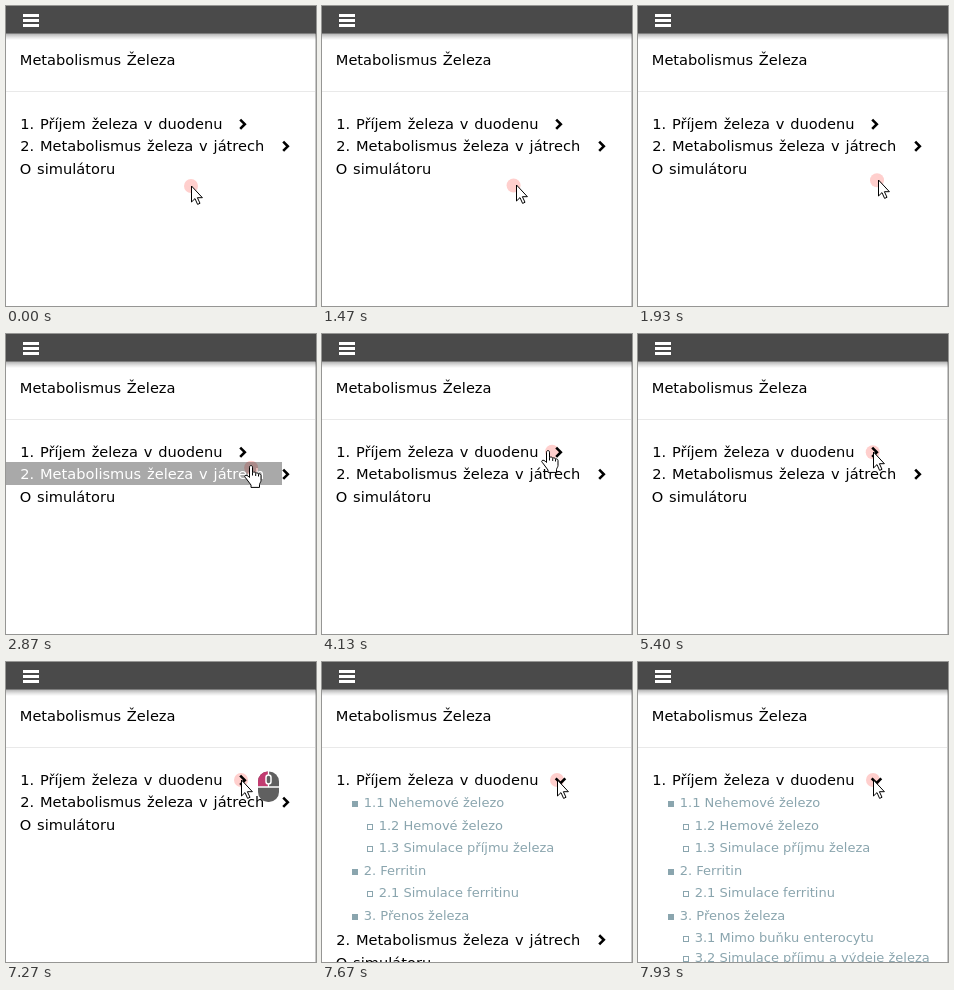
An HTML page for the animation above (8 s loop, 310 by 300 pixels).

```html
<!DOCTYPE html>
<html lang="cs">
<head>
<meta charset="utf-8">
<title>Menu</title>
<style>
  html, body { margin: 0; width: 100%; height: 100%; overflow: hidden; background: #fff; }
  svg { display: block; width: 310px; height: 300px; }
  text { font-family: "DejaVu Sans", Verdana, sans-serif; white-space: pre; }
  .item { font-size: 14.6px; word-spacing: 1.2px; }
  .sub { font-size: 13px; fill: #8aa5ae; }
  .chevron { fill: none; stroke: #000; stroke-width: 2.6px; }
  #halo { fill: #ffcfcd; mix-blend-mode: multiply; }
</style>
</head>
<body>
<svg viewBox="0 0 310 300" xmlns="http://www.w3.org/2000/svg">
  <defs>
    <linearGradient id="shade" x1="0" y1="0" x2="0" y2="1">
      <stop offset="0" stop-opacity=".65"/>
      <stop offset=".2" stop-opacity=".26"/>
      <stop offset=".6" stop-opacity=".11"/>
      <stop offset="1" stop-opacity="0"/>
    </linearGradient>
    <clipPath id="fold"><rect id="foldBox" x="0" y="129" width="310" height="0"/></clipPath>
  </defs>
  <rect width="310" height="300" fill="#fff"/>
  <rect y="85" width="309" height="1" fill="#e9e9e9"/>
  <text class="item" x="13.8" y="59">Metabolismus Železa</text>

  <rect id="hover1" y="106" width="233" height="22" fill="#a9a9a9"/>
  <text id="label1" class="item" x="14.2" y="123">1. Příjem železa v duodenu</text>
  <path id="closed" class="chevron" d="M234.2 113.6l4.6 4.6l-4.6 4.6"/>
  <path id="open" class="chevron" d="M233.7 116.4l4.8 4.8l4.8 -4.8"/>
  <g id="subs" clip-path="url(#fold)"></g>
  <g id="rest">
    <rect id="hover2" y="128" width="276" height="23" fill="#a9a9a9"/>
    <text id="label2" class="item" x="14.2" y="145">2. Metabolismus železa v játrech</text>
    <path class="chevron" d="M277.2 135.7l4.6 4.6l-4.6 4.6"/>
    <text class="item" x="13.8" y="168">O simulátoru</text>
  </g>

  <rect x="309" y="27" width="1" height="273" fill="#c8c8c8"/>
  <rect y="27" width="310" height="7" fill="url(#shade)"/>
  <rect width="310" height="27" fill="#4a4a4a"/>
  <path d="M17 9.5h16M17 14.5h16M17 19.5h16" stroke="#fff" stroke-width="2.8"/>

  <circle id="halo" r="7"/>
  <g id="mouse">
    <rect x="252" y="109.5" width="21" height="30.5" rx="10" fill="#606060"/>
    <path d="M261.5 109.5h.5v15h-10v-5a10 10 0 0 1 9.5 -10z" fill="#c23b70"/>
    <path d="M252 125h21M262.5 109v16" stroke="#fff" stroke-width="1.3"/>
    <rect x="260" y="113" width="5" height="9" rx="2.5" fill="#606060" stroke="#fff" stroke-width="1.5"/>
  </g>
  <g fill="#fff" stroke="#000" stroke-linejoin="round">
    <path id="arrow" d="M.5 0V16L4 12.6L6.6 18.4L9 17.3L6.4 11.7H11.4Z"/>
    <path id="hand" d="M5.5 2.2C5.5 0 8.5 0 8.5 2.2V7.5C9.5 6.7 11.5 6.9 11.7 8.2C12.5 7.6 14.2 7.8 14.5 9C15.5 8.6 17 9.2 17 10.5V15.5C17 17 15.5 18.5 15.5 19.5V22.4H7V20L2.5 14C1 12 .2 11.5 1 10.7C2 9.6 3.8 10.5 5.5 12.5ZM8.5 7.5V10.5M11.7 8.3V11M14.5 9.2V11.5"/>
  </g>
</svg>
<script>
const LOOP = 8000, FOLD = 225, LAG = 0.27;
const $ = id => document.getElementById(id);

// Label, nesting level and baseline of each submenu row.
const rows = [
  ["1.1 Nehemové železo", 0, 145],
  ["1.2 Hemové železo", 1, 168],
  ["1.3 Simulace příjmu železa", 1, 190],
  ["2. Ferritin", 0, 213],
  ["2.1 Simulace ferritinu", 1, 235],
  ["3. Přenos železa", 0, 258],
  ["3.1 Mimo buňku enterocytu", 1, 280],
  ["3.2 Simulace příjmu a výdeje železa", 1, 300]
];
$("subs").innerHTML = rows.map(([label, level, y]) => {
  const bullet = level
    ? `<rect x="45.5" y="${y - 5.5}" width="5" height="5" fill="none" stroke="#8aa5ae"/>`
    : `<rect x="30" y="${y - 6}" width="6" height="6" fill="#8aa5ae"/>`;
  return `${bullet}<text class="sub" x="${level ? 56.7 : 41.8}" y="${y}">${label}</text>`;
}).join("");

// Pointer path: tick, x, y (15 ticks per second).
const path = [
  [21, 185, 180], [23, 203, 178.5], [26, 226, 176], [29, 240.3, 174], [33, 247, 172],
  [36, 247, 172], [38, 247, 165], [41, 246, 145], [43, 245, 132], [45, 242.5, 123], [47, 241, 120],
  [61, 241, 120], [62, 226, 117], [64, 216, 117], [67, 212, 117],
  [71, 212, 117], [75, 222, 118], [78, 232, 121], [81, 235, 118]
];

function pointerAt(tick) {
  const i = path.findIndex(p => p[0] >= tick);
  if (i === 0) return path[0].slice(1);
  if (i < 0) return path[path.length - 1].slice(1);
  const [ta, xa, ya] = path[i - 1], [tb, xb, yb] = path[i];
  const u = (tick - ta) / (tb - ta);
  return [xa + (xb - xa) * u, ya + (yb - ya) * u];
}

function itemAt([x, y]) {
  if (y >= 106 && y < 128 && x < 233) return 1;
  if (y >= 128 && y < 151 && x < 276) return 2;
  return 0;
}

const show = (id, on) => $(id).setAttribute("visibility", on ? "visible" : "hidden");
const move = (id, x, y) => $(id).setAttribute("transform", `translate(${x} ${y})`);

function draw(ms) {
  const tick = Math.floor(ms * 0.015 + 0.06);
  const pos = pointerAt(tick);
  const [x, y] = pos.map(Math.round);
  const [hx, hy] = pointerAt(tick - LAG);
  const onItem = itemAt(pos) > 0;
  // The highlight follows the pointer one tick late.
  const hovered = itemAt(pointerAt(tick - 1));

  for (const n of [1, 2]) {
    show("hover" + n, hovered === n);
    $("label" + n).setAttribute("fill", hovered === n ? "#fff" : "#000");
  }
  move("halo", hx, hy);
  move("arrow", x, y);
  move("hand", x - 7, y - 1);
  show("arrow", !onItem);
  show("hand", onItem);
  show("mouse", tick >= 109 && tick < 112);

  const u = Math.min(1, Math.max(0, (tick - 111) / 7));
  const height = FOLD * (0.5 - Math.cos(Math.PI * u) / 2);
  $("foldBox").setAttribute("height", height);
  move("rest", 0, height);
  show("closed", u === 0);
  show("open", u > 0);
}

const start = performance.now();
function loop() {
  draw((performance.now() - start) % LOOP);
  requestAnimationFrame(loop);
}
loop();
</script>
</body>
</html>
```
